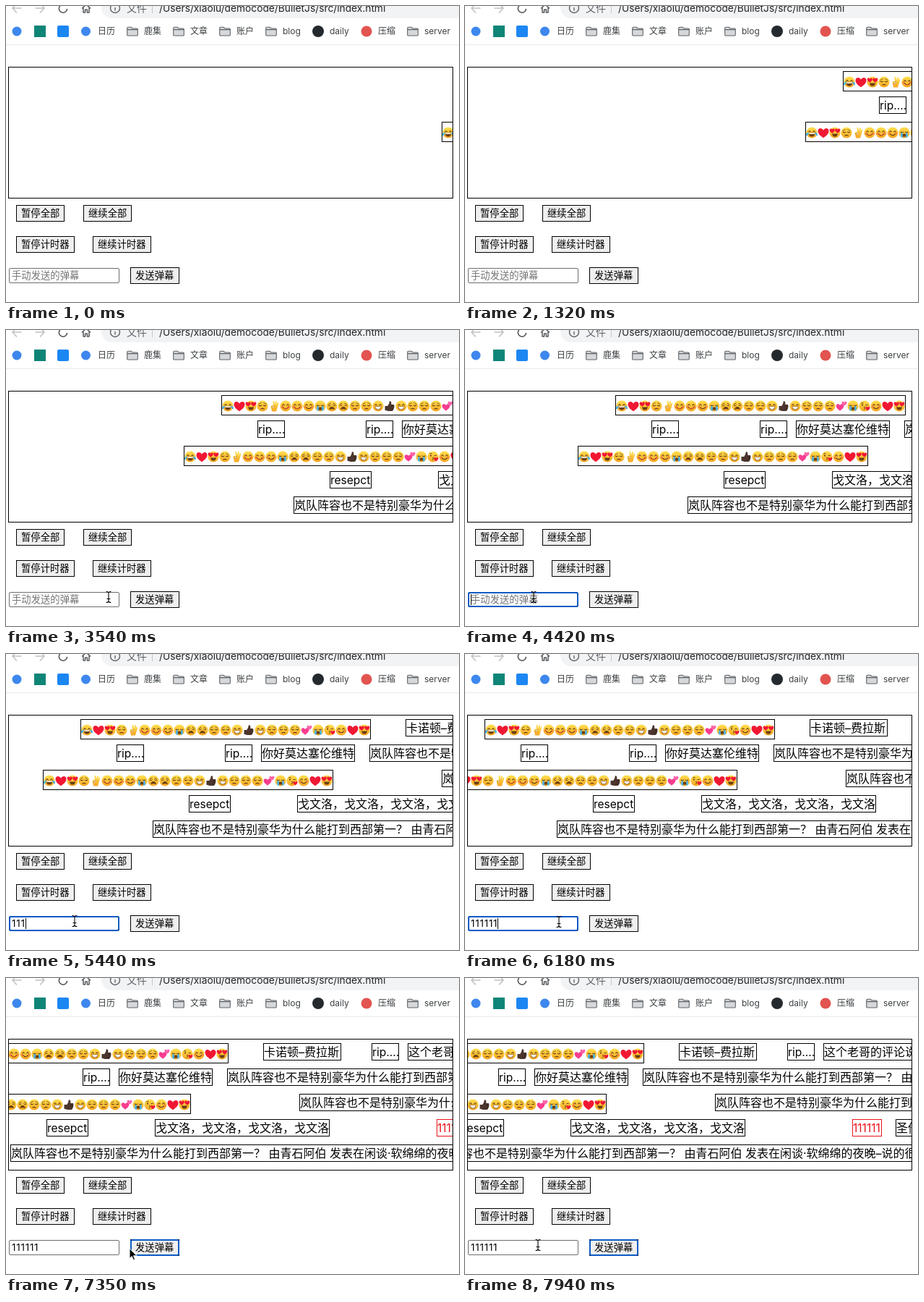
These frames come from a looping animation (627x409 px, 8 s). An HTML page:

```html
<!DOCTYPE html>
<html lang="zh-CN">
<head>
<meta charset="utf-8">
<title>弹幕</title>
<style>
html, body { margin: 0; width: 100%; height: 100%; overflow: hidden; background: #fff; }
svg { display: block; width: 627px; height: 409px; }
text { font-family: Inter, 'Noto Sans CJK SC', 'Noto Sans CJK', sans-serif; white-space: pre; }
</style>
</head>
<body>
<svg id="stage" viewBox="0 0 627 409"></svg>
<script>
const LOOP = 8000;
const stage = document.getElementById('stage');

const path = (d, color, width = 1, fill = 'none') =>
  `<path d="${d}" fill="${fill}" stroke="${color}" stroke-width="${width}" stroke-linecap="round" stroke-linejoin="round"/>`;
const shape = (d, fill) => `<path d="${d}" fill="${fill}"/>`;
const disc = (x, y, r, fill) => `<circle cx="${x}" cy="${y}" r="${r}" fill="${fill}"/>`;
const rect = (x, y, w, h, attrs) => `<rect x="${x}" y="${y}" width="${w}" height="${h}" ${attrs}/>`;
const label = (x, y, size, fill, str, attrs = '') =>
  `<text x="${x}" y="${y}" font-size="${size}" fill="${fill}" ${attrs}>${str}</text>`;

// Emoji, each in a 16 x 16 cell
const BROWN = '#6b3f12', RED = '#f01733', BLUE = '#45b4ee';
const heart = (x, y, k, fill) =>
  `<g transform="translate(${x} ${y}) scale(${k})">${shape('M0 7C-5 3.5-7.5 1-7.5-2.5C-7.5-7-2-7.5 0-3.5C2-7.5 7.5-7 7.5-2.5C7.5 1 5 3.5 0 7Z', fill)}</g>`;
const face = parts => disc(8, 8, 7.6, 'url(#skin)') + parts;
const blush = disc(3.2, 9.2, 1.8, '#f58a3c') + disc(12.8, 9.2, 1.8, '#f58a3c');
const happyEyes = path('M3.7 7Q5 4.6 6.3 7M9.7 7Q11 4.6 12.3 7', BROWN, 1.1);
const sadEyes = path('M3.3 7Q5 8.6 6.7 7.2M9.3 7.2Q11 8.6 12.7 7', BROWN, 1.1);
const smile = path('M4.6 10Q8 13.6 11.4 10', BROWN, 1.1);
const grin = shape('M3.6 8.5H12.4Q12 13.5 8 13.5Q4 13.5 3.6 8.5Z', BROWN);

const EMOJI = {
  j: face(happyEyes + grin + shape('M4 8.6H12L11.6 10H4.4Z', '#fff') +
    shape('M3.8 7.6Q-.8 8.6 .2 12Q2.6 13.6 3.8 7.6ZM12.2 7.6Q16.8 8.6 15.8 12Q13.4 13.6 12.2 7.6Z', BLUE)),
  h: heart(8, 8.2, 1, RED),
  l: face(heart(4.2, 5.4, .48, RED) + heart(11.8, 5.4, .48, RED) +
    shape('M4 9.4H12Q11.2 13.6 8 13.6Q4.8 13.6 4 9.4Z', BROWN)),
  p: face(sadEyes + path('M3.2 5.2Q5 4.6 6.4 3.6M12.8 5.2Q11 4.6 9.6 3.6', BROWN, .8) +
    path('M5.8 12Q8 10.8 10.2 12', BROWN, 1.1)),
  o: shape('M5 15.6L4 10.6Q2.6 7.6 5.6 6.8L7 7.4L6.4 1.6Q7.4 0 8.4 1.6L9 6L10.2 1.4Q11.6 .4 12 2L11.4 7L13 3.6Q14.4 3.2 14.2 5L12.4 11L11 15.6Z', 'url(#skin)') +
    path('M5.2 9Q7.6 6.6 8.2 9Q7.4 11.6 5.4 10.6Z', '#c67c14', .8, '#fff'),
  s: face(blush + happyEyes + path('M4.2 9.6Q8 14.4 11.8 9.6', '#a3351f', 1.2)),
  b: face(blush + happyEyes + smile),
  t: face(sadEyes + shape('M5.2 10.5Q8 8.4 10.8 10.5V13Q8 14.6 5.2 13Z', BROWN) +
    shape('M3.4 8.2H5.8V15Q4 14.6 3 13.2ZM10.2 8.2H12.6L13 13.2Q12 14.6 10.2 15Z', BLUE)),
  w: face(path('M3.2 6.2L6 4.2M12.8 6.2L10 4.2M3.6 7.8Q5.4 8.2 6.4 6.8M12.4 7.8Q10.6 8.2 9.6 6.8', BROWN, 1) +
    shape('M4 13Q5 9 8 9Q11 9 12 13Q8 11.4 4 13Z', BROWN)),
  g: face(happyEyes + grin + shape('M4.2 9.1H11.8Q11.2 12.7 8 12.7Q4.8 12.7 4.2 9.1Z', '#fff') +
    path('M4.6 10.9H11.4', '#b9a48c', .5)),
  u: shape('M1.5 8H5.2Q7.6 5.2 7.8 1.4Q10.6 .2 10.4 6H13.6Q15 6.8 14.2 8.4Q15 9.8 13.9 10.8Q14.2 12.4 13 13Q13 14.8 11 15H6L1.5 13.8Z', '#4b352c') +
    path('M10.6 8.4H13.8M10.6 10.8H13.4M10.4 13H12.8', '#2c1d18', .6),
  H: heart(6, 9.6, .72, '#f73d8f') + heart(12, 4.6, .46, '#fb62a8'),
  k: face(disc(5, 6.6, 1.1, BROWN) + path('M9.6 6.8Q11 5.2 12.6 6.6M3.6 4Q5 3 6.2 3.8', BROWN, 1) +
    path('M7.4 9.2Q9.6 9.6 8 10.8Q9.6 11.8 7.4 12.6', BROWN, 1) + heart(12.4, 11.6, .4, RED))
};
const CHAIN = 'jhlpossbtwwppgugpppHtkbhl';

// Bullets: row, start x, text, box width
const LONG = '岚队阵容也不是特别豪华为什么能打到西部第一？ 由青石阿伯 发表在闲谈·软绵绵的夜晚–说的很有道理';
const BULLETS = [
  [0, 654, CHAIN, 402], [0, 1104, '卡诺顿–费拉斯', 108], [0, 1254, 'rip....', 38], [0, 1304, '这个老哥的评论说得好', 162],
  [1, 704, 'rip....', 38], [1, 854, 'rip....', 38], [1, 904, '你好莫达塞伦维特', 130], [1, 1054, LONG, 780],
  [2, 602, CHAIN, 402], [2, 1154, LONG, 780],
  [3, 804, 'resepct', 58], [3, 954, '戈文洛，戈文洛，戈文洛，戈文洛', 242], [3, 1344, '111111', 41], [3, 1404, '圣他们都这样说', 114],
  [4, 754, LONG, 780]
];

function bullet([row, x, str, w]) {
  const y = 90 + row * 35, chain = str === CHAIN, own = str === '111111';
  const color = own ? '#e8141c' : '#000';
  const body = chain
    ? [...str].map((c, i) => `<use href="#e-${c}" x="${x + 1 + i * 16}" y="${y + 7}"/>`).join('')
    : label(x + 1, y + 18, /^[ -~]+$/.test(str) ? 15.5 : 16, color, str);
  const box = rect(x + .5, y + .5, w - 1, chain ? 27 : 23, `fill="none" stroke="${color}"`);
  return `<g${own ? ' id="own"' : ''}>${box}${body}</g>`;
}

const button = (x, y, w, str) =>
  rect(x + .5, y + .5, w - 1, 22, 'fill="#efefef" stroke="#000"') + label(x + 7, y + 16.3, 13.333, '#000', str);

const folder = x => path(`M${x + .7} 30.5V40Q${x + .7} 41 ${x + 2} 41H${x + 14}Q${x + 15.3} 41 ${x + 15.3} 40V32Q${x + 15.3} 31 ${x + 14} 31H${x + 8}L${x + 6.5} 29.3H${x + 2}Q${x + .7} 29.3 ${x + .7} 30.5ZM${x + 1} 32.6H${x + 15}`, '#5f6368', 1.1, '#d6d8da');

const MARKS = [[127, '日历'], [191, '鹿集', 1], [255, '文章', 1], [319, '账户', 1], [383, 'blog', 1],
  [448, 'daily'], [515, '压缩'], [579, 'server', 1]];

const toolbar =
  rect(132, -14, 520, 31, 'rx="15" fill="#f1f3f4"') +
  path('M21 3H9.5M14.5-3L9 3L14.5 9', '#c0c2c5', 1.6) + path('M41 3H52.5M47.5-3L53 3L47.5 9', '#c0c2c5', 1.6) +
  path('M84.5 4.5A5.6 5.6 0 1 1 82.5-.8', '#55595d', 1.6) +
  path('M105.5 3L111-2L116.5 3M107 2.5V9H109.6V5H112.4V9H115V2.5', '#55595d', 1.5) +
  path('M157.5 3A6.5 6.5 0 1 1 144.5 3A6.5 6.5 0 1 1 157.5 3M151 2.5V6', '#5f6368', 1.4) +
  label(167, 8, 14, '#5f6368', '文件') + rect(202, -4, 1, 14, 'fill="#c6c9cc"') +
  label(212, 8, 13.75, '#24272a', '/Users/xiaolu/democode/BulletJs/src/index.html') +
  disc(15, 35, 6.5, '#3d87ee') + rect(39, 27, 16, 16, 'fill="#0f8577"') +
  rect(71, 27, 16, 16, 'rx="2" fill="#1c86f2"') + disc(110.5, 35, 6.5, '#3d87ee') +
  disc(432, 35, 8, '#24292e') + disc(499, 35, 7.5, '#e2544f') +
  MARKS.map(([x, str, dir]) => (dir ? folder(x - 24) : '') + label(x, 39.3, 12, '#3c4043', str)).join('') +
  rect(0, 53, 627, 1, 'fill="#e8e9ea"');

stage.innerHTML =
  `<defs><linearGradient id="skin" x1="0" y1="0" x2="0" y2="1"><stop stop-color="#ffe04f"/><stop offset="1" stop-color="#f5a623"/></linearGradient>
  <clipPath id="screen">${rect(4, 85, 614, 180, '')}</clipPath>` +
  Object.entries(EMOJI).map(([k, art]) => `<g id="e-${k}">${art}</g>`).join('') + '</defs>' +
  rect(0, 0, 627, 409, 'fill="#fff"') + toolbar +
  rect(3.5, 84.5, 615, 181, 'fill="none" stroke="#000"') +
  `<g clip-path="url(#screen)"><g id="flow">${BULLETS.map(bullet).join('')}</g></g>` +
  button(14, 275, 67, '暂停全部') + button(107, 275, 67, '继续全部') +
  button(14, 318, 81, '暂停计时器') + button(120, 318, 81, '继续计时器') + button(172, 361, 68, '发送弹幕') +
  rect(4.5, 362.5, 152, 20, 'rx="1.5" fill="#fff" stroke="#6e6e6e"') +
  rect(5, 363, 151, 19, 'id="fieldRing" rx="2" fill="none" stroke="#0b5bc4" stroke-width="2"') +
  rect(173, 362, 66, 21, 'id="sendRing" rx="2" fill="none" stroke="#0b5bc4" stroke-width="2"') +
  label(8, 377.3, 13.333, '#757575', '手动发送的弹幕', 'id="hint"') +
  label(8, 377.3, 13.333, '#000', '', 'id="typed" letter-spacing=".8"') +
  rect(8, 365, 1, 15, 'id="caret" fill="#000"') +
  `<g id="beam">${path('M-3-7.5Q0-7.5 0-5.5V5.5Q0 7.5-3 7.5M3-7.5Q0-7.5 0-5.5M0 5.5Q0 7.5 3 7.5M-2 2.5H2', '#000', 1.1)}</g>` +
  `<g id="arrow">${path('M0 0V13.5L3.2 10.6L5.4 15.6L7.6 14.6L5.4 9.8H9.8Z', '#fff', 1, '#000')}</g>`;

const el = {};
for (const id of ['flow', 'own', 'fieldRing', 'sendRing', 'hint', 'typed', 'caret', 'beam', 'arrow'])
  el[id] = document.getElementById(id);
const show = (node, on) => node.setAttribute('visibility', on ? 'visible' : 'hidden');
const move = (node, x, y) => node.setAttribute('transform', `translate(${x} ${y})`);

// The screen refreshes in groups of eight ticks
const GROUPS = [150, 1320, 2500, 3690, 4860, 6030, 7210];
function tickAt(t) {
  const g = GROUPS.filter(s => s <= t).length - 1;
  return g < 0 ? 0 : 1 + 8 * g + Math.min(7, Math.floor((t - GROUPS[g] + 6) / 146));
}

function along(keys, n) {
  let i = 0;
  while (i < keys.length - 2 && n >= keys[i + 1][0]) i++;
  const a = keys[i], b = keys[i + 1];
  const k = Math.min(1, Math.max(0, (n - a[0]) / (b[0] - a[0])));
  return a.slice(1).map((v, j) => Math.round(v + (b[j + 1] - v) * k));
}

const SCROLL = [[0, -1], [8, 116], [16, 236], [37, 551], [46, 688], [54, 808]];
const POINTER = [[22, 150, 400], [23, 146, 386], [24, 142, 369], [28, 95, 369], [41, 95, 369], [44, 201, 371],
  [47, 201, 372], [49, 201, 376], [52, 110, 369], [54, 101, 369]];
const FOCUS = 29, SEND = 49;

function draw(t) {
  const n = tickAt(t);
  move(el.flow, -along(SCROLL, n)[0], 0);

  const focused = n >= FOCUS && n < SEND;
  const count = n < 34 ? 0 : n < 37 ? n - 33 : Math.min(6, n - 34);
  const since = t - (n >= 40 ? 5880 : n >= 34 ? t : 4270);
  show(el.fieldRing, focused);
  show(el.sendRing, n >= SEND);
  show(el.own, n >= SEND);
  show(el.hint, !count);
  el.typed.textContent = '1'.repeat(count);
  el.caret.setAttribute('x', Math.round(8 + (count ? el.typed.getComputedTextLength() : 0)));
  show(el.caret, focused && since % 1000 < 500);

  const [x, y] = along(POINTER, n);
  const inField = x < 157 && y < 383;
  show(el.beam, n >= 22 && inField);
  show(el.arrow, n >= 22 && !inField);
  move(el.beam, x, y);
  move(el.arrow, x, y);
}

function loop() {
  draw(performance.now() % LOOP);
  requestAnimationFrame(loop);
}
loop();
</script>
</body>
</html>
```
